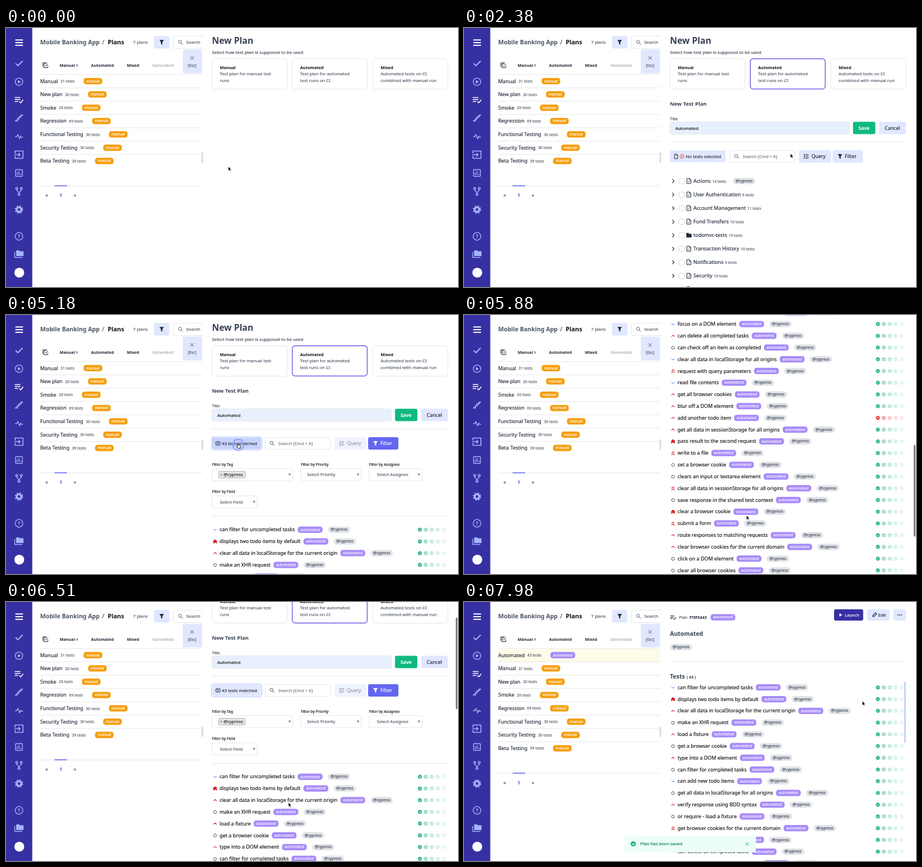
Animation of 800x460 px, one loop 8 s. Source, as an HTML page:

```html
<!DOCTYPE html>
<html lang="en">
<head>
<meta charset="utf-8">
<title>New test plan</title>
<style>
html, body { margin: 0; width: 100%; height: 100%; overflow: hidden; background: #fff; }
svg { display: block; width: 800px; height: 460px; font-family: "Noto Sans", "Open Sans", sans-serif; }
text { white-space: pre; }
</style>
</head>
<body>
<svg id="stage" viewBox="0 0 800 460" xmlns="http://www.w3.org/2000/svg"></svg>
<script>
const LOOP = 8000, STEP = 70, ROW = 20.83, PLAN = 23.65;
const INK = '#1f2937', TEXT = '#4b5563', LINE = '#e5e7eb', PALE = '#e0e7ff', HOVER = '#c7d2fe',
  DEEP = '#3730a3', INDIGO = '#4f46e5', ACTIVE = '#6366f1', GREEN = '#10b981', RED = '#dc2626';

const pen = document.createElement('canvas').getContext('2d');
function width(s, size, weight = 400) {
  pen.font = `${weight} ${size * 10}px "Noto Sans", "Open Sans", sans-serif`;
  return pen.measureText(s).width / 10;
}

// Markup helpers; regular text gets a hairline stroke to read as a sturdier face
const text = (x, y, s, size, fill = INK, weight = 400, anchor = 'start') =>
  `<text x="${x}" y="${y}" font-size="${size}" fill="${fill}" stroke="${fill}" stroke-width="${weight > 500 ? 0 : .15}" font-weight="${weight}" text-anchor="${anchor}">${s}</text>`;
const rect = (x, y, w, h, r, fill, stroke = 'none', sw = 1, id = '') =>
  `<rect ${id && `id="${id}"`} x="${x}" y="${y}" width="${w}" height="${h}" rx="${r}" fill="${fill}" stroke="${stroke}" stroke-width="${sw}"/>`;
const path = (d, stroke, sw = 1, fill = 'none') =>
  `<path d="${d}" stroke="${stroke}" stroke-width="${sw}" fill="${fill}" stroke-linejoin="round"/>`;
const dot = (x, y, r, fill, stroke = 'none', sw = 1) =>
  `<circle cx="${x}" cy="${y}" r="${r}" fill="${fill}" stroke="${stroke}" stroke-width="${sw}"/>`;
const rule = (x1, x2, y) => path(`M${x1} ${y}H${x2}`, LINE);
const at = (x, y, body) => `<g transform="translate(${x} ${y})">${body}</g>`;
const group = (id, body) => `<g id="${id}">${body}</g>`;

const funnel = (x, y, fill) => at(x, y, path('M-4-4H4L1.2 0V4.2L-1.2 3V0Z', 'none', 0, fill));
const lens = (x, y) => at(x, y, dot(-1, -1, 2.7, 'none', TEXT, .9) + path('M1 1L4 4', TEXT, 1));
const cross = (x, y, r, color) => path(`M${x - r} ${y - r}l${2 * r} ${2 * r}m0 ${-2 * r}l${-2 * r} ${2 * r}`, color);
const listCheck = (color, sw) => path('M-7-4H3M-7-.5H3M-7 3H-1M1 3L3.5 5.5L8 0', color, sw);
const doc = (x, y) => at(x, y, path('M-3.5-4.5H1L3.5-2V4.5H-3.5Z M1-4.5V-2H3.5', INK, 1) + path('M-1.7 1.2L-.4 2.4L1.8-.2', INK, .9));

function badge(x, y, s, fill) {
  const w = width(s, 6.7) + 9.2;
  return rect(x, y - 5.6, w, 11.2, 4.5, fill) + text(x + w / 2, y + 2.2, s, 6.7, '#fff', 400, 'middle');
}
function chip(x, y) {
  const s = '@cypress', w = width(s, 6.8) + 9.4;
  return rect(x, y - 5.6, w, 11.2, 5.6, '#e1e3e8') + text(x + w / 2, y + 2.1, s, 6.8, '#374151', 400, 'middle');
}

function sidebar() {
  const c = '#a5b4fc';
  return rect(0, 0, 46.5, 460, 0, DEEP) +
    path('M16.5 21.3H30M16.5 26H30M16.5 30.7H30', '#fff', 2) +
    at(23, 63, path('M-6 0L-2 4L6.5-4.5', c, 1.9)) +
    at(23, 95.5, dot(0, 0, 6.6, 'none', c, 1.4) + path('M-2-3.2L3.2 0L-2 3.2Z', 'none', 0, c)) +
    at(22.5, 127.5, listCheck('#fff', 1.6)) +
    at(23, 160, path('M-7 5H-3V1.5H0V-2H3.5V-5H7', c, 2)) +
    at(23, 193, path('M-7 0H-4L-2-4L1 4L3-1L4 1H7', c, 1.4)) +
    at(23, 225, path('M-7-2V-6.5H7V6.5H-7V2M-8 0H2M-1-3L2 0L-1 3', c, 1.6)) +
    at(23, 257.5, rect(-6, -6, 12, 12, 1, 'none', c, 1.4) + path('M-3 3.5V-1M0 3.5V-3.5M3 3.5V1', c, 1.4)) +
    at(23, 290, dot(-4, -5, 1.8, 'none', c, 1.4) + dot(4, -5, 1.8, 'none', c, 1.4) + dot(0, 5.5, 1.8, 'none', c, 1.4) +
      path('M-4-3C-4 1 0 0 0 3.5C0 0 4 1 4-3', c, 1.5)) +
    at(23, 322.5, dot(0, 0, 4, 'none', c, 3.2) + `<circle r="6.2" fill="none" stroke="${c}" stroke-width="2.2" stroke-dasharray="2.7 2.17"/>`) +
    at(23, 370, dot(0, 0, 6.8, 'none', c, 1.3) + text(0, 3.4, '?', 9.5, c, 600, 'middle')) +
    at(23, 401, path('M-5-6H0L1.5-4.5H8V4H-5Z', 'none', 0, c) + path('M-7.5-3V6.5H6', c, 1.4)) +
    dot(23.5, 434.5, 8.7, '#fff');
}

function planRow(name, count, y, kind, fill) {
  const cx = 60.5 + width(name, 8.95) + 4.5, s = count + ' tests';
  return text(60.5, y + 3.2, name, 8.95) + text(cx, y + 2.6, s, 6.8, TEXT) +
    badge(cx + width(s, 6.8) + 16, y, kind, fill);
}

function plans() {
  const list = [['Manual', 31], ['New plan', 20], ['Smoke', 20], ['Regression', 69],
    ['Functional Testing', 30], ['Security Testing', 30], ['Beta Testing', 39]];
  const rows = list.map(([n, c], i) => planRow(n, c, 94.3 + i * PLAN, 'manual', '#f59e0b') +
    (i < 6 ? rule(60.5, 347, 106.3 + i * PLAN) : '')).join('');
  const pager = rule(60.5, 347, 280.5) + rect(86, 279.5, 22, 1.6, 0, ACTIVE) +
    text(72, 300, '«', 9, TEXT, 400, 'middle') + text(97, 300, '1', 8, INDIGO, 600, 'middle') +
    text(122, 300, '»', 9, TEXT, 400, 'middle');
  return text(60.5, 29.2, 'Mobile Banking App', 10.5, TEXT, 600) + text(170, 29.2, '/', 11, TEXT, 400) +
    text(180, 29.2, 'Plans', 10.8, '#111', 600) + text(225, 28, '7 plans', 7.7, TEXT) +
    rect(262, 14, 27, 22.5, 3, PALE) + funnel(275.5, 25.3, INK) +
    rect(296, 14.5, 80, 22, 3, '#fff', LINE) + lens(309, 25.5) + text(319, 28.2, 'Search', 7.9, TEXT) +
    at(69.5, 66, path('M3-4.3H-4.3V2.8M4.5 1V4.5H-2.5V-2.5H2M-.8.2L1 2L4.8-2.5', INK, 1)) +
    text(95, 68.8, 'Manual', 7.2, INK, 600) + text(123.8, 68.8, '7', 6, INK, 600) +
    text(150.5, 68.8, 'Automated', 7.2, INK, 600) + text(214, 68.8, 'Mixed', 7.2, INK, 600) +
    text(259, 68.8, 'Generated', 7.6, '#9ca3af') + rule(60.5, 347, 82.7) +
    group('fresh', rect(60.5, 83, 287, 23, 0, '#fefce8') +
      planRow('Automated', 43, 94.3, 'automated', '#a78bfa') + rule(60.5, 347, 106.3)) +
    group('rows', rows + pager) +
    rect(313, 38.5, 34, 42, 2, PALE) + cross(329.3, 53.2, 3, TEXT) +
    text(329.3, 69, '[Esc]', 6.8, TEXT, 400, 'middle') +
    rect(346, 221, 3, 18.5, 0, '#dcdde1');
}

function card(x, title, a, b) {
  return rect(x, 54.5, 133, 54, 5, '#fff', LINE) + text(x + 14, 72.8, title, 7.4, '#111', 600) +
    text(x + 14, 84.4, a, 7.8, TEXT) + text(x + 14, 95.9, b, 7.8, TEXT);
}

// Search box, query and filter buttons, placed from the search box's left edge
function tools(x, dim, id) {
  return rect(x, 217.5, 115.5, 21, 3, '#fff', LINE) + lens(x + 12, 228) + text(x + 23, 230.8, 'Search [Cmd + K]', 7.65, '#6b7280') +
    `<g opacity="${dim ? .5 : 1}">` + rect(x + 122.5, 217, 56.5, 22, 3, PALE) +
    at(x + 135, 228, path('M-4.5-3H-.5M2-3H4.5M-4.5 0H-3M0 0H4.5M-4.5 3H0M2.5 3H4.5M1-4.6V-1.4M-2.2-1.6V1.6M1.2 1.4V4.6', INK, 1.1)) +
    text(x + 144.5, 231.2, 'Query', 8.6, INK, 500) + '</g>' +
    rect(x + 182, 217, 53.5, 22, 3, PALE, 'none', 0, id) +
    `<g id="${id}Label">` + funnel(x + 195, 228, 'currentColor') + text(x + 203.5, 231.2, 'Filter', 8.8, 'currentColor', 500) + '</g>';
}

function tree() {
  const items = [['Actions', 14], ['User Authentication', 9], ['Account Management', 11], ['Fund Transfers', 10],
    ['todomvc-tests', 19], ['Transaction History', 10], ['Notifications', 9], ['Security', 10], ['Reports', 9]];
  return items.map(([n, c], i) => {
    const y = 271.7 + i * 24.05, cx = 406 + width(n, 8.95) + 2.5, s = c + ' tests';
    return path(`M368.7 ${y - 3}l3 3.2l-3 3.2`, INK, 1.2) + rect(380.5, y - 4.5, 9.5, 9.5, 2, '#fff', '#d6d9df', .9) +
      (n === 'todomvc-tests' ? at(398, y, path('M-4.5-4H-1L.5-2.5H4.7V4H-4.5Z', 'none', 0, INK)) : doc(398, y)) +
      text(406, y + 3, n, 8.95) + text(cx, y + 2.8, s, 6.8, TEXT) + (i ? '' : chip(cx + width(s, 6.8) + 12, y));
  }).join('');
}

function select(x, y, w, name, tx) {
  return text(364.5 + x, y - 5.2, 'Filter by ' + name, 6.6, '#111') + rect(364.5 + x, y, w, 21.5, 3, '#fff', LINE) +
    group('hint' + name, text(tx, y + 13.6, 'Select ' + name, 7.7, TEXT)) +
    at(364.5 + x + w - 5.5, y + 11, path('M-2.4-2.2H2.4L0 2.4Z', 'none', 0, '#8b8f98'));
}

// d: low, u: high, w: double, f: critical, o: normal
const marks = {
  d: path('M-2.6-1L0 1.4L2.6-1', '#60a5fa', 1.1),
  u: path('M-2.7 1.4L0-1.2L2.7 1.4', RED, 1.1),
  w: path('M-2.7 0L0-2.6L2.7 0M-2.7 3.4L0 .8L2.7 3.4', RED, 1.1),
  f: path('M-3.4-.8L0-3.8L3.4-.8V3.8L0 2L-3.4 3.8Z', 'none', 0, RED),
  o: dot(0, 0.3, 2.6, 'none', TEXT, 1)
};
const tests = `d can filter for uncompleted tasks
f displays two todo items by default
u clear all data in localStorage for the current origin
o make an XHR request
u load a fixture
o get a browser cookie
u type into a DOM element
o can filter for completed tasks
d can add new todo items
o get all data in localStorage for all origins
u verify response using BDD syntax
o or require - load a fixture
w get browser cookies for the current domain
d focus on a DOM element
u can delete all completed tasks
o can check off an item as completed
d clear all data in localStorage for all origins
w request with query parameters
d read file contents
u get all browser cookies
u blur off a DOM element
u add another todo item
u get all data in sessionStorage for all origins
f pass result to the second request
w write to a file
o set a browser cookie
o clears an input or textarea element
w clear all data in sessionStorage for all origins
o save response in the shared test context
f clear a browser cookie
w submit a form
u route responses to matching requests
u clear browser cookies for the current domain
o click on a DOM element
o clear all browser cookies
u scroll an element into view
o check a checkbox element
d select an option in a list
u double click on a DOM element
o trigger an event on an element
u wait for a specific request
o go back in the browser history
d reload the current page`.split('\n');

function testList(top) {
  return tests.map((line, i) => {
    const y = top + i * ROW, name = line.slice(2), failed = name === 'add another todo item';
    const bx = 378 + width(name, 8.95) + 5, cx = bx + width('automated', 6.7) + 18.6;
    const runs = [1, .5, .32, .2, .12].map((o, k) => at(732.5 + k * 10.5, y, `<g opacity="${o}">` +
      dot(0, 0, 3.5, failed ? '#ef4444' : '#34b880') +
      path(failed ? 'M-1.6 0H1.6' : 'M-1.6 0L-.4 1.2L1.7-1.1', '#fff', .9) + '</g>')).join('');
    return at(370, y, marks[line[0]]) + text(378, y + 3.1, name, 8.95, '#111') +
      badge(bx, y, 'automated', '#a78bfa') + chip(cx, y) + runs;
  }).join('');
}

function form() {
  const body = text(364.5, 138, 'New Test Plan', 9.3, '#374151', 600) + text(364.5, 163.8, 'Title', 7, '#374151') +
    rect(364.5, 166.7, 317.5, 21.8, 3, '#fff', LINE, 1, 'field') +
    group('empty', text(374, 180.8, 'Plan title', 8, '#9ca3af')) + group('caret', path('M373.8 172.5V183', INK, .7)) +
    group('value', text(374, 180.8, 'Automated', 7.8, '#111')) +
    rect(688.5, 166.5, 39.5, 22, 3, GREEN, 'none', 0, 'save') + text(708, 181, 'Save', 8.5, '#fff', 600, 'middle') +
    rect(735, 166.5, 47, 22, 3, PALE) + text(758.3, 181, 'Cancel', 8.7, INK, 500, 'middle') + rule(364.5, 782, 202.5);
  const pick = rect(364.5, 217.5, 98.5, 21, 3, PALE) + at(375.3, 228, path('M-2.7-4H.8L2.9-1.8V4H-2.7ZM.8-4V-1.8H2.9', INK, 1)) +
    dot(386, 228, 3.4, 'none', '#ef4444', 1) + path('M386 226V228.7M386 229.4V230.3', '#ef4444', 1) +
    text(392.5, 230.8, 'No tests selected', 7.8, INK, 500) + tools(470.5, false, 'filterA') + group('tree', tree());
  const filters = select(0, 272.7, 143, 'Tag', 375) + select(157.5, 272.7, 106.5, 'Priority', 533) +
    select(278, 272.7, 94, 'Assignee', 656.5) + select(0, 321.2, 80, 'Field', 378.5) + rule(364.5, 782, 357.5) +
    group('tag', rect(376, 277.5, 47.5, 12, 2, '#e4e4e4', '#aaa', .8) + text(378.7, 286, '×', 6.5, '#777') + text(385, 286.2, '@cypress', 7.8, '#222'));
  const match = rect(363.8, 216.5, 89, 23, 4, 'none', HOVER, 1.4) + rect(365, 217.8, 86.5, 20.5, 3, PALE, 'none', 0, 'matched') +
    rect(371.5, 225, 7.5, 6, 1, 'none', INK, 1) + dot(375, 227.8, 1.3, 'none', INK, .8) +
    text(382, 230.8, '43 tests matched', 7.75, INK, 500) + tools(459, true, 'filterB') + testList(381.3);
  return text(364.5, 28.3, 'New Plan', 15.6, '#374151', 600) + text(364.5, 45.8, 'Select how test plan is supposed to be used', 7.93, '#374151') +
    card(364.5, 'Manual', 'Test plan for manual test', 'runs') + card(506.5, 'Automated', 'Test plan for automated', 'test runs on CI') +
    card(649, 'Mixed', 'Automated tests on CI', 'combined with manual run') +
    group('chosen', rect(506.7, 54.7, 132.6, 53.6, 5, 'none', INDIGO, 1.2)) +
    group('body', body + group('pick', pick) + group('filters', filters) + group('match', match) +
      group('tip', path('M416 193L420 188.7L424 193Z', 'none', 0, '#16181d') + rect(410.5, 192.3, 72, 20.7, 3, '#16181d') +
        text(416.5, 205, 'Automated', 5.8, '#fff', 600)));
}

function saved() {
  return at(370, 27, `<g transform="scale(.7)">${listCheck(INK, 1.5)}</g>`) + text(380.5, 29.8, 'Plan', 7.4, TEXT) +
    text(399, 29.8, 'f70f3d43', 7.2, INK, 600) + badge(436.3, 27.2, 'automated', '#a78bfa') +
    rect(655, 13, 51.5, 20, 3, DEEP) + path('M664.5 20L669.5 23L664.5 26Z', 'none', 0, '#fff') + text(674, 26, 'Launch', 7.5, '#fff', 500) +
    rect(713.5, 13, 39.5, 20, 3, PALE) + at(726.5, 23, path('M-3 3V1L2-4L4-2L-1 3Z', INK, 1.1)) + text(733, 26, 'Edit', 7.7, INK, 500) +
    rect(760, 13, 22, 20, 3, PALE) + [768, 771, 774].map(x => dot(x, 23, .9, INK)).join('') +
    text(364.5, 59.8, 'Automated', 10.4, '#374151', 600) + chip(364.5, 80.2) + rule(364.5, 782, 105.5) +
    text(364.5, 136.3, 'Tests', 10.5, '#374151', 600) + text(394, 136, '( 43 )', 7, '#374151', 600) +
    testList(151.7) + rect(779, 142, 3, 108, 1, HOVER);
}

const toast = rect(284.5, 415, 232, 29.5, 3, '#ecfdf5') + dot(299.5, 429.5, 4.6, GREEN) +
  path('M297.3 429.6L299 431.2L301.9 428', '#fff', 1.1) + text(312, 432.4, 'Plan has been saved', 7.8, '#047857', 500) + cross(501, 429.5, 3, GREEN);

const pointer = group('ring', dot(0, 0, 10, '#a5b4fc55', '#7f9cf0', 1.3)) +
  group('arrow', path('M0 0V7.4L1.8 5.9L3 8.5L4.2 7.9L3.1 5.4H5.2Z', '#fff', .5, '#000')) +
  group('hand', path('M-.6-2.6Q.2-3.6.9-2.6V.4L3.7 1.2Q4.6 1.6 4.3 2.8L3.4 6H-.3L-2.7 2.7Q-2.5 1.5-.6 2.6Z', '#111', .9, '#fff')) +
  group('beam', path('M-1.6-3.8Q0-3.8 0-2.8V2.8Q0 3.8-1.6 3.8M1.6-3.8Q0-3.8 0-2.8M0 2.8Q0 3.8 1.6 3.8', '#111', .9));

document.getElementById('stage').innerHTML =
  '<defs><clipPath id="leftClip"><rect x="46" width="303" height="460"/></clipPath>' +
  '<clipPath id="rightClip"><rect x="349" width="451" height="460"/></clipPath></defs>' +
  rect(0, 0, 800, 460, 0, '#fff') + sidebar() + `<g clip-path="url(#leftClip)">${plans()}</g>` +
  `<g clip-path="url(#rightClip)">${group('form', form())}${group('saved', saved())}</g>` +
  rect(796, 2, 3, 163, 1.5, '#7d7d7d', 'none', 0, 'thumb') + group('toast', toast) + group('cursor', pointer);

const $ = id => document.getElementById(id);
const show = (id, on) => { $(id).style.display = on ? '' : 'none'; };
const move = (id, x, y) => $(id).setAttribute('transform', `translate(${x} ${y})`);
const fill = (id, color) => $(id).setAttribute('fill', color);
const smooth = k => k * k * (3 - 2 * k);
const within = (t, spans) => spans.some(([a, b]) => t >= a && t < b);

function track(keys, t, col, ease = k => k) {
  let i = 0;
  while (i < keys.length - 2 && t >= keys[i + 1][0]) i++;
  const a = keys[i], b = keys[i + 1];
  const k = Math.min(1, Math.max(0, (t - a[0]) / (b[0] - a[0])));
  return a[col] + (b[col] - a[col]) * ease(k);
}

const cursorPath = [[0, 393.5, 246], [420, 548, 88], [630, 548, 88], [1190, 446, 180], [1470, 446, 180], [1680, 446, 203],
  [2030, 446, 203], [2660, 672, 237.5], [3440, 672, 237.5], [3920, 430, 283], [4480, 430, 288], [5040, 411, 230.5],
  [5320, 411, 230.5], [5530, 500, 356], [6580, 500, 356], [7000, 705, 176], [8000, 705, 176]];
const scrollPath = [[5680, 0], [5740, 80], [5810, 370], [5880, 636], [5950, 790], [6020, 838], [6230, 838],
  [6300, 700], [6370, 430], [6440, 200], [6510, 71], [6580, 0]];
const clicks = [460, 1340, 1720, 2860, 3960, 4210, 5120, 7030];
const FORM = 560, FILLED = 1750, OPEN = 3010, TAGGED = 4270, MATCHED = 4620, SAVED = 7280;

function draw(t) {
  const done = t >= SAVED, filled = t >= FILLED, open = t >= OPEN, matched = t >= MATCHED;
  const focus = t >= 1330 && t < 2000;
  show('fresh', done);
  move('rows', 0, done ? PLAN : 0);
  show('form', !done);
  show('saved', done);
  show('chosen', t >= 490);
  show('body', t >= FORM);
  show('empty', !filled);
  show('value', filled);
  show('caret', focus && !filled);
  show('tip', t >= 1330 && !filled);
  fill('field', filled ? '#e8f0fe' : '#fff');
  $('field').setAttribute('stroke', focus ? INDIGO : LINE);
  fill('save', filled ? GREEN : '#9fdfc2');
  show('pick', !matched);
  show('match', matched);
  show('filters', open);
  move('tree', 0, open ? 111.7 : 0);
  show('tag', t >= TAGGED);
  show('hintTag', t < TAGGED);

  const overFilter = t >= 2590 && t < 3520;
  fill('filterA', open ? (overFilter ? DEEP : ACTIVE) : overFilter ? HOVER : PALE);
  $('filterALabel').style.color = open ? '#fff' : INK;
  fill('filterB', ACTIVE);
  $('filterBLabel').style.color = '#fff';
  fill('matched', within(t, [[4970, 5380]]) ? HOVER : PALE);

  const y = track(scrollPath, t, 1);
  move('form', 0, -y);
  show('thumb', t >= 5680 && t < 7100);
  $('thumb').setAttribute('y', 2 + y * 460 / 1280);
  $('thumb').setAttribute('opacity', Math.min(1, Math.max(0, (7100 - t) / 200)));

  show('toast', t >= 7350);
  move('toast', 0, 45 * (1 - smooth(Math.min(1, Math.max(0, (t - 7350) / 200)))));

  move('cursor', track(cursorPath, t, 1, smooth), track(cursorPath, t, 2, smooth));
  const hand = within(t, [[330, 700], [2590, 3520], [4970, 5380], [6950, SAVED]]);
  const beam = within(t, [[1120, 1550]]);
  show('hand', hand);
  show('beam', beam);
  show('arrow', !hand && !beam);
  show('ring', clicks.some(c => t >= c && t < c + 200));
}

const start = performance.now();
function tick(now) {
  const t = Math.max(0, now - start) % LOOP;
  draw(Math.floor((t + 5) / STEP) * STEP);
  requestAnimationFrame(tick);
}
draw(0);
requestAnimationFrame(tick);
</script>
</body>
</html>
```
